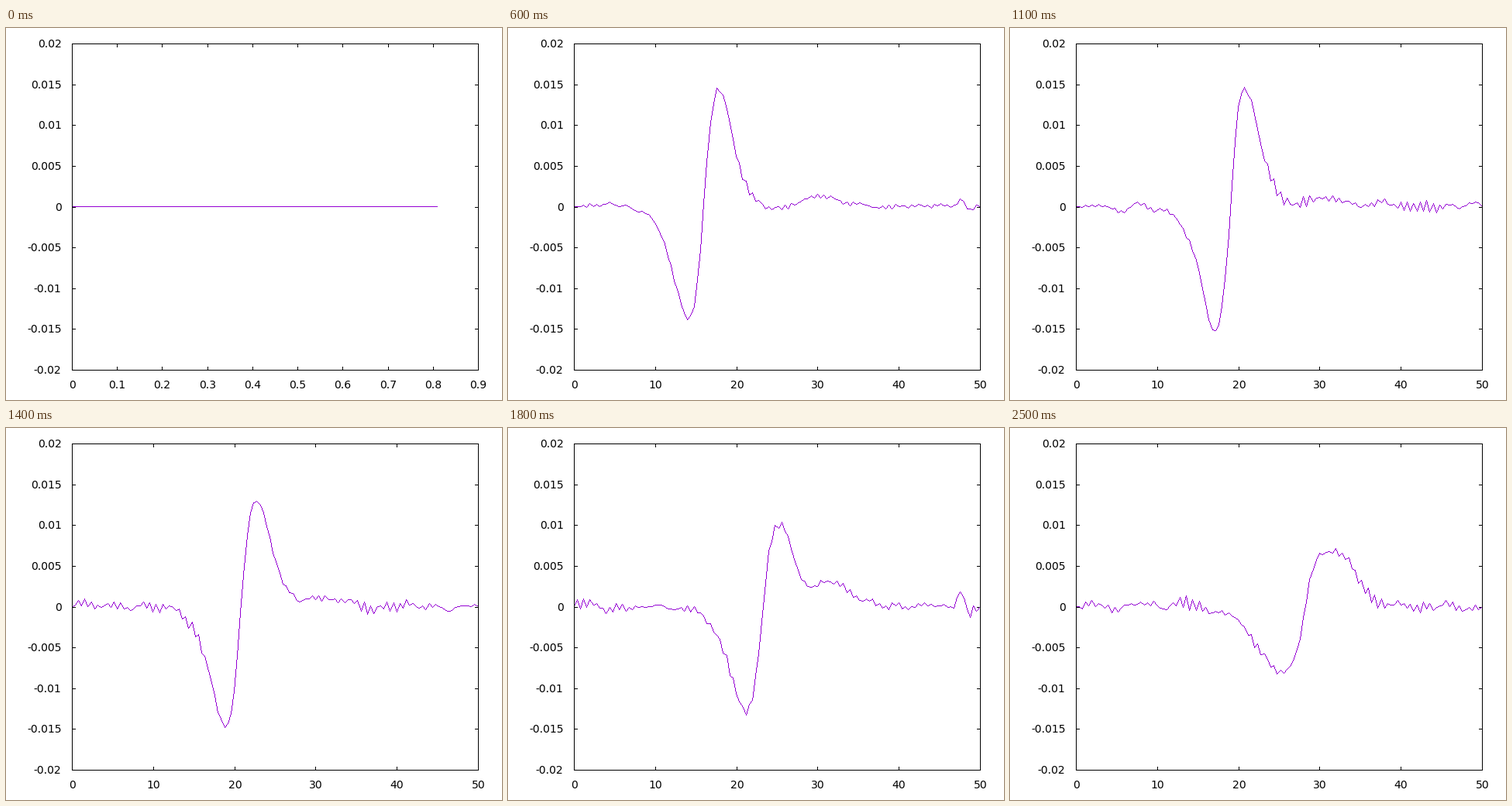
Recreate the animation shown at these times as a matplotlib script. Size 640x480 px, loop 2.6 s.

```python
import numpy as np
import matplotlib.pyplot as plt
from matplotlib.animation import FuncAnimation
from matplotlib.collections import LineCollection

W, H, DPI = 640, 480, 100
FRAMES, INTERVAL = 26, 100
LEFT, RIGHT, TOP, BOTTOM = 85, 609, 20, 441
ZERO = 230
PX_PER_MILLI = (BOTTOM - TOP) / 40
SAMPLES = np.arange(126)
PURPLE = "#9400d3"
PIXEL = 72 / DPI

# Lobe heights in thousandths at a few moments
MOMENTS = [0, 10, 14, 18, 22, 25]
TROUGHS = [12.3, 15.2, 14.6, 12.7, 11, 8.4]
PEAKS = [12.7, 15.3, 13.3, 10.4, 6.2, 4.4]


def lobe(r):
    """Skewed hump that starts at 0 and reaches 1 at r = 1."""
    r = np.maximum(r, 0)
    return r * np.exp((1 - r ** 1.5) / 1.5)


def bell(x, width):
    return np.exp(-.5 * (x / width) ** 2)


def ease(t):
    t = np.clip(t, 0, 1)
    return t * t * (3 - 2 * t)


def wave(n):
    """A travelling trough and peak that run into a slow hump ahead."""
    u = SAMPLES - (30.9 + 1.515 * n + .7 * max(0, n - 22))
    trough = np.interp(n, MOMENTS, TROUGHS) * lobe(-u / (4.7 + 2.8 * (n / 25) ** 6))
    peak = np.interp(n, MOMENTS, PEAKS) * lobe(u / 4.5)
    hump = (1.3 + 3.7 * ease((n - 13) / 11)) * bell(SAMPLES - 73 - .36 * n, 5.5)
    dip = max(0, 1 - n / 14) * bell(u - 24, 4)
    return peak - trough + hump - dip


def roughness(n):
    rng = np.random.default_rng(40 + n)

    def drift(span):
        kernel = np.hanning(span + 2)
        noise = rng.normal(size=len(SAMPLES))
        return np.convolve(noise, kernel / np.linalg.norm(kernel), "same")

    zigzag = .32 * drift(11) * (-1.0) ** SAMPLES
    strength = np.clip((n - 2) / 6, .1, 1)
    end_kick = max(0, np.cos(2 * np.pi * (n - 3) / 15)) * np.exp((3 - n) / 35)
    burst = 2.6 * bell(SAMPLES - 120, 2.1) * np.cos(np.pi * (SAMPLES - 119) / 3)
    return strength * (zigzag + .25 * drift(5)) + end_kick * burst


def curve(n):
    if n == 0:
        return np.array([LEFT, LEFT + (RIGHT - LEFT) * .9]), np.array([ZERO, ZERO])
    y = wave(n) + roughness(n)
    y[[0, -1]] = 0
    return LEFT + SAMPLES * (RIGHT - LEFT) / 125, ZERO + .5 - y * PX_PER_MILLI


def pixel_dashes(x, y):
    """Rasterise a polyline into hard one-pixel dashes."""
    x, y = np.floor(x), np.floor(y)
    steps = np.maximum(abs(np.diff(x)), abs(np.diff(y)))
    along = np.concatenate([[0], np.cumsum(steps)])
    t = np.arange(along[-1] + 1)
    px = np.floor(np.interp(t, along, x) + .5)
    py = np.floor(np.interp(t, along, y) + .5) + .5
    return np.stack([np.column_stack([px, py]), np.column_stack([px + 1, py])], axis=1)


fig = plt.figure(figsize=(W / DPI, H / DPI), dpi=DPI, facecolor="white")
ax = fig.add_axes([0, 0, 1, 1])
ax.set(xlim=(0, W), ylim=(H, 0))
ax.axis("off")


def stroke(xs, ys, zorder=1):
    return ax.plot(np.array(xs) + .5, np.array(ys) + .5, color="black", lw=PIXEL,
                   snap=False, solid_capstyle="projecting",
                   solid_joinstyle="miter", zorder=zorder)[0]


def label(x, y, text, ha):
    return ax.text(x, y, text, ha=ha, va="baseline", fontsize=14 * PIXEL,
                   family="DejaVu Sans")


def x_axis(values, upper):
    """Ticks on both horizontal borders, with labels below."""
    parts = []
    for value in values:
        x = int(LEFT + (RIGHT - LEFT) * value / upper + .5)
        parts += [stroke([x, x], [TOP, TOP + 4]),
                  stroke([x, x], [BOTTOM - 4, BOTTOM]),
                  label(x + .5, 465, f"{value:g}", "center")]
    return parts


for k in range(9):
    y = int(TOP + (BOTTOM - TOP) * k / 8 + .5)
    stroke([LEFT, LEFT + 4], [y, y])
    stroke([RIGHT - 4, RIGHT], [y, y])
    label(71.5, y + 5, f"{(4 - k) * 5 / 1000:g}", "right")

stroke([LEFT, RIGHT, RIGHT, LEFT, LEFT], [TOP, TOP, BOTTOM, BOTTOM, TOP], 3)
start_axis = x_axis(np.arange(10) / 10, .9)
main_axis = x_axis(range(0, 51, 10), 50)
line = ax.add_collection(LineCollection([], colors=PURPLE, linewidths=PIXEL,
                                        capstyle="butt", snap=False, zorder=2),
                         autolim=False)


def update(n):
    line.set_segments(pixel_dashes(*curve(n)))
    for part in start_axis:
        part.set_visible(n == 0)
    for part in main_axis:
        part.set_visible(n > 0)
    return [line]


anim = FuncAnimation(fig, update, frames=FRAMES, interval=INTERVAL,
                     repeat=True, repeat_delay=0, blit=False)
plt.show()
```
